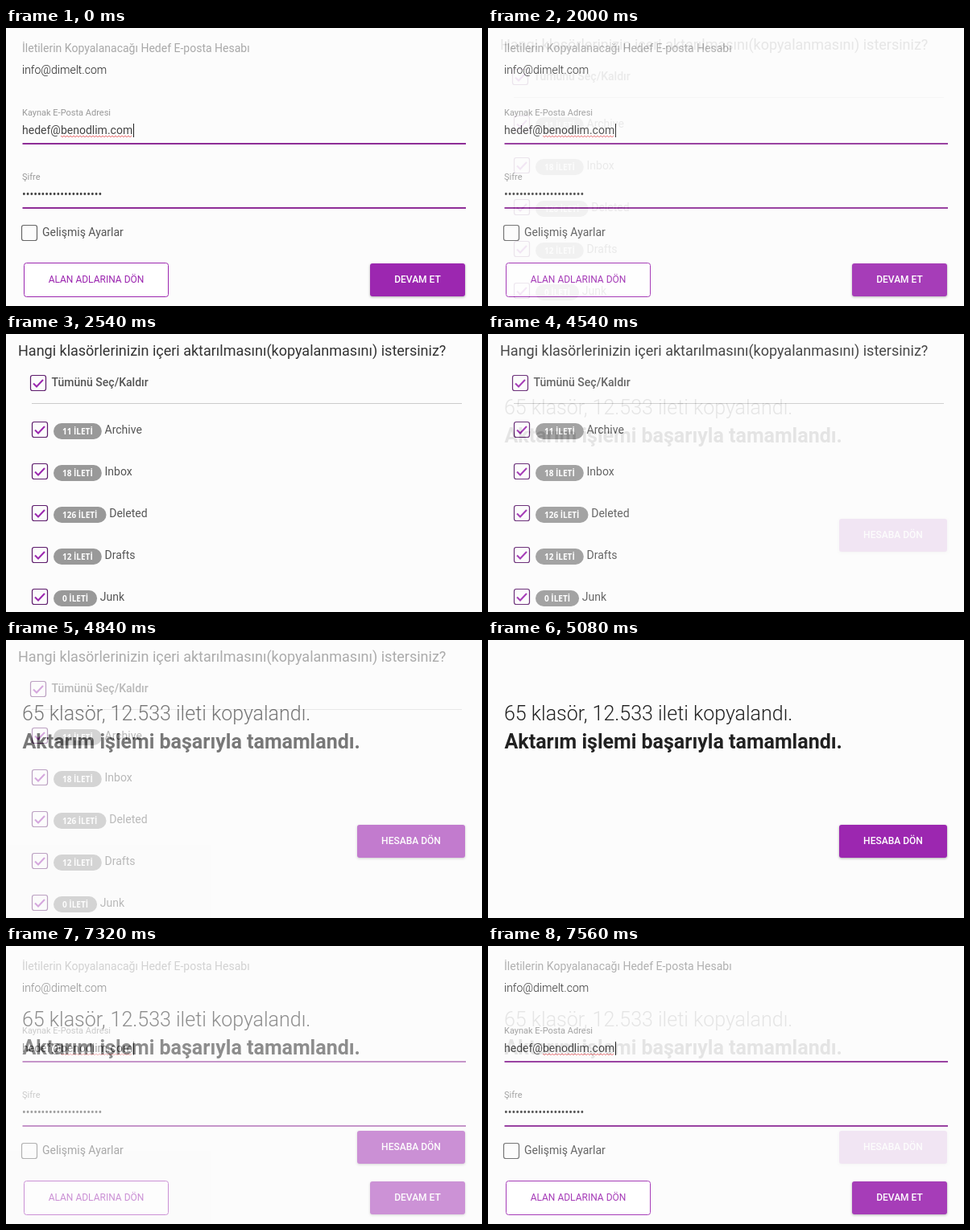
Animation of 591x346 px, one loop 7620 ms. Source, as an HTML page:

```html
<!DOCTYPE html>
<html lang="tr">
<head>
<meta charset="utf-8">
<title>E-posta aktarımı</title>
<style>
  html, body { margin: 0; width: 100%; height: 100%; overflow: hidden; background: #fcfcfc; }
  svg { display: block; font-family: Roboto, Arial, sans-serif; }
  .shadow { filter: drop-shadow(0 1px 1.5px rgba(0, 0, 0, .3)); }
</style>
</head>
<body>
<svg id="stage" width="591" height="346" viewBox="0 0 591 346"></svg>
<script>
const PURPLE = '#9c27b0', GREY = '#555', PALE = '#a8a8a8';
const HOLD = 2000, STEP = 60, PHASE = 2540;

const text = (x, y, size, fill, str, weight = 400, more = '') =>
  `<text x="${x}" y="${y}" font-size="${size}" fill="${fill}" font-weight="${weight}" ${more}>${str}</text>`;

const rect = (x, y, w, h, r, fill, more = '') =>
  `<rect x="${x}" y="${y}" width="${w}" height="${h}" rx="${r}" fill="${fill}" ${more}/>`;

const path = (d, stroke, width) =>
  `<path d="${d}" fill="none" stroke="${stroke}" stroke-width="${width}"/>`;

const button = (x, y, w, label) =>
  rect(x, y, w, 41, 3, PURPLE, 'class="shadow"') +
  text(x + w / 2, y + 24, 12, '#fff', label, 500, 'text-anchor="middle"');

const box = (x, y, stroke) =>
  rect(x + .5, y + .5, 19, 19, 2.5, 'none', `stroke="${stroke}" stroke-width="1.2"`);

const checked = (x, y) =>
  box(x, y, '#5c1a6b') + path(`M${x + 4} ${y + 10.5}l4 4 8-8.5`, PURPLE, 2);

const underline = y => rect(20.5, y, 550.5, 2, 0, '#8e2d97');

const folderRow = ([count, name], i) => {
  const y = 109 + i * 52, w = 48.4 + 5.7 * String(count).length;
  return checked(32, y) +
    rect(59, y + 2, w, 20, 10, '#999') +
    text(59 + w / 2, y + 15.5, 10, '#fff', count + ' İLETİ', 700,
      'text-anchor="middle" font-family="Open Sans, sans-serif"') +
    text(59 + w + 3.7, y + 15, 14, GREY, name);
};

const form =
  text(20, 30, 14, PALE, 'İletilerin Kopyalanacağı Hedef E-posta Hesabı') +
  text(20, 57, 14, '#222', 'info@dimelt.com', 300) +
  text(20, 109, 11, '#999', 'Kaynak E-Posta Adresi') +
  text(20, 132, 14, '#444', 'hedef@benodlim.com') +
  path('M68 134' + 'l2 1.8 2-1.8'.repeat(22), '#e5484d', .8) +
  rect(158, 119, 1, 17, 0, '#222') +
  underline(143) +
  text(20, 189, 11, '#999', 'Şifre') +
  text(20, 212, 14, '#444', '•'.repeat(21)) +
  underline(223) +
  box(19, 245, '#666') +
  text(45, 259, 14, GREY, 'Gelişmiş Ayarlar') +
  rect(22.5, 292.5, 179, 42, 3, '#fff', `stroke="${PURPLE}"`) +
  text(112, 317, 12, PURPLE, 'ALAN ADLARINA DÖN', 400, 'text-anchor="middle"') +
  button(452, 293, 118, 'DEVAM ET');

const folders =
  text(15, 27, 18, '#333', 'Hangi klasörlerinizin içeri aktarılmasını(kopyalanmasını) istersiniz?') +
  checked(30, 51) +
  text(56.5, 65, 14, GREY, 'Tümünü Seç/Kaldır', 500) +
  rect(32, 86, 534, 1, 0, '#ccc') +
  [[11, 'Archive'], [18, 'Inbox'], [126, 'Deleted'], [12, 'Drafts'], [0, 'Junk']].map(folderRow).join('');

const done =
  text(20, 100, 25, '#222', '65 klasör, 12.533 ileti kopyalandı.', 300) +
  text(20.5, 135, 25, '#212121', 'Aktarım işlemi başarıyla tamamlandı.', 700) +
  button(436, 230, 134, 'HESABA DÖN');

const stage = document.getElementById('stage');
stage.innerHTML = [form, folders, done]
  .map(scene => `<g>${rect(0, 0, 591, 346, 0, '#fcfcfc')}${scene}</g>`).join('');
const [, second, third] = stage.children;

// Scenes are stacked: the upper two fade in, and the last fades out to show the first.
function draw() {
  const t = performance.now() % (3 * PHASE);
  const phase = Math.floor(t / PHASE);
  const fade = Math.max(0, Math.floor((t % PHASE - HOLD) / STEP) + 1) / 10;
  second.style.opacity = [fade, 1, 0][phase];
  third.style.opacity = [0, fade, 1 - fade][phase];
  requestAnimationFrame(draw);
}
draw();
</script>
</body>
</html>
```
